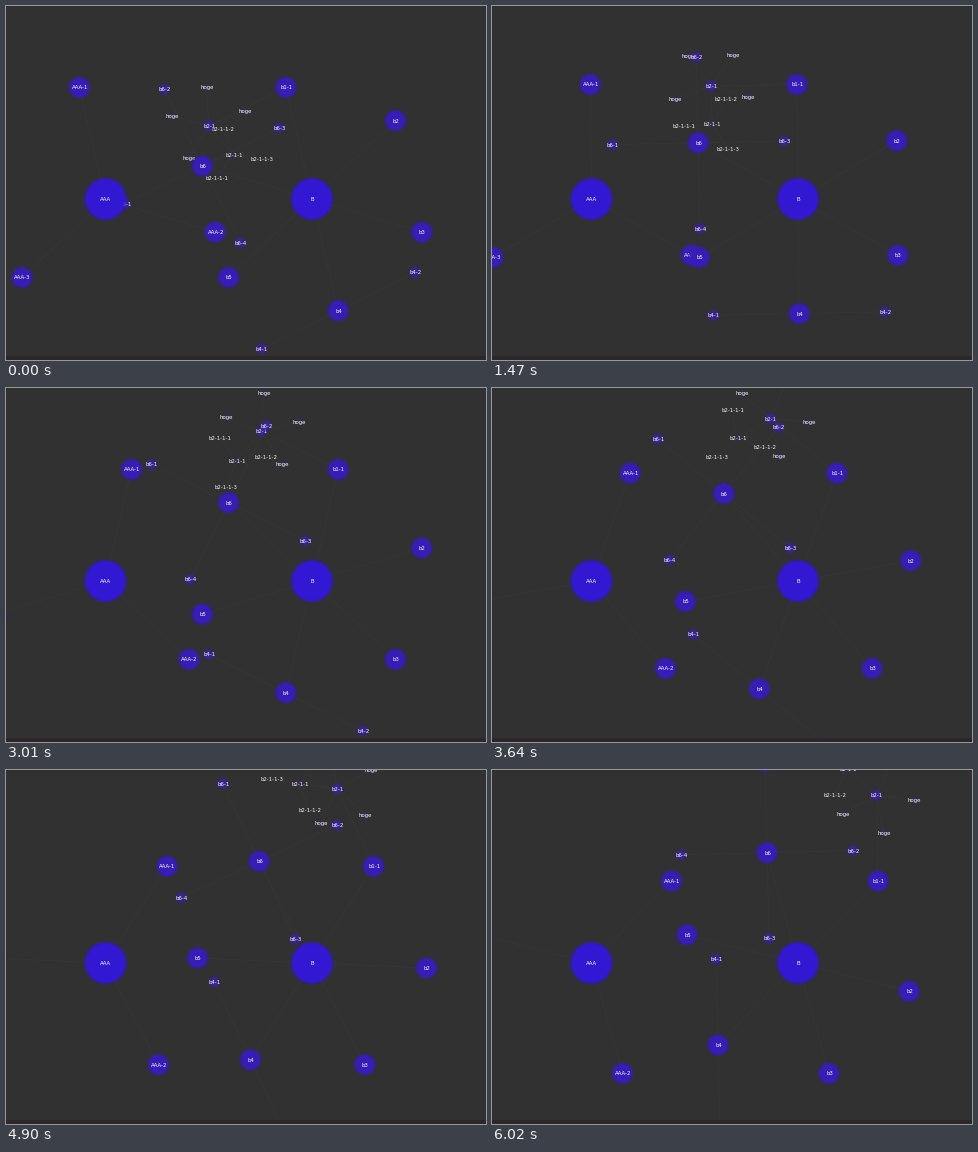
A matplotlib script that plays this animation: 480x354 px, repeating every 6.09 s.

```python
import numpy as np
import matplotlib.pyplot as plt
from matplotlib.animation import FuncAnimation
from matplotlib.collections import LineCollection
from matplotlib.patches import Circle, Polygon, Rectangle

W, H, DPI = 480, 354, 100
STEP, COUNT = 70, 87
DEPTHS = 4

# inner orbit angle in degrees at a few times; depth d turns d times as fast
TIMES = [0, 840, 2100, 3010, 4340, 5390, 6020]
ANGLES = [-103.2, -96.9, -84.3, -76.8, -63.0, -52.7, -45.7]

# orbit radius per depth; the last ring starts on the opposite side
ORBIT = [0, 114.6, 85.8, 38.3, -28.6]

RADIUS, BLUR, RINGS = 20.7, 1.8, 6


def rgb(r, g, b):
    return r / 255, g / 255, b / 255


def number(stem, n):
    return [(f"{stem}-{k + 1}", []) for k in range(n)]


B21 = [("b2-1-1", number("b2-1-1", 3))] + [("hoge", [])] * 4
B = [("b1-1", [("b2-1", B21)]), ("b2", []), ("b3", []),
     ("b4", number("b4", 2)), ("b5", []), ("b6", number("b6", 4))]
ROOTS = [("AAA", (99.5, 193), number("AAA", 3)), ("B", (306, 193), B)]

fig = plt.figure(figsize=(W / DPI, H / DPI), dpi=DPI, facecolor=rgb(49, 49, 49))
ax = fig.add_axes([0, 0, 1, 1])
ax.set_xlim(0, W)
ax.set_ylim(H, 0)
ax.axis("off")


def soft_disc(depth, z):
    """Stacked circles whose opacity rises evenly across a blurred edge."""
    if depth == DEPTHS:
        return []
    r = RADIUS / 2 ** depth
    color = rgb(51 + 5 * depth, 24 + 5 * depth, 212 - 27 * depth)
    share = (0.995 - 0.018 * depth ** 3) / RINGS
    return [ax.add_patch(Circle((0, 0), edge, fc=color, lw=0, zorder=z,
                                alpha=share / (1 - share * k)))
            for k, edge in enumerate(np.linspace(r + BLUR, r - BLUR, RINGS))]


class Node:
    def __init__(self, name, parent=None, pos=(0, 0), share=0):
        self.parent, self.share = parent, share
        self.pos = np.array(pos, float)
        self.depth = parent.depth + 1 if parent else 0
        z = 50 - 10 * self.depth + 0.1 * len(nodes)
        self.discs = soft_disc(self.depth, z)
        self.label = ax.text(
            0, 0, name, color=rgb(245, 245, 250), fontsize=5.4 * 72 / DPI,
            family="DejaVu Sans", ha="center", va="center_baseline",
            zorder=z + 0.05, clip_on=True)
        nodes.append(self)

    def move(self, angle):
        if self.parent:
            a = np.radians(self.depth * angle + 360 * self.share)
            self.pos = self.parent.pos + ORBIT[self.depth] * np.array([np.cos(a), np.sin(a)])
        for disc in self.discs:
            disc.center = self.pos
        self.label.set_position(self.pos + (0.5, 0))


def grow(parent, children):
    for k, (name, below) in enumerate(children):
        grow(Node(name, parent, share=k / len(children)), below)


nodes = []
for name, pos, children in ROOTS:
    grow(Node(name, pos=pos), children)

links = ax.add_collection(LineCollection([], colors=[rgb(53, 53, 53)], linewidths=0.6, zorder=1))
ax.add_patch(Rectangle((0, 350), W, 4, fc=rgb(45, 39, 42), lw=0, zorder=90))

ARROW = np.array([(0, 0), (0, 6), (1.5, 4.9), (2.5, 7), (3.4, 6.6), (2.5, 4.6), (4.2, 4.4)])
cursor = ax.add_patch(Polygon(ARROW, fc=rgb(40, 40, 40), ec=rgb(215, 215, 215),
                              lw=0.5, zorder=95))


def draw(i):
    t = STEP * i
    angle = np.interp(t, TIMES, ANGLES)
    for node in nodes:
        node.move(angle)
    links.set_segments([(n.parent.pos, n.pos) for n in nodes if n.parent])
    # the pointer slips in from below, rests and leaves
    y = np.interp(t, [420, 770, 910, 1190], [356, 339, 339, 356])
    cursor.set_xy(ARROW + (394.5, y))
    return []


anim = FuncAnimation(fig, draw, frames=COUNT, interval=STEP, init_func=lambda: draw(0),
                     repeat=True, repeat_delay=0, blit=False)
plt.show()
```
